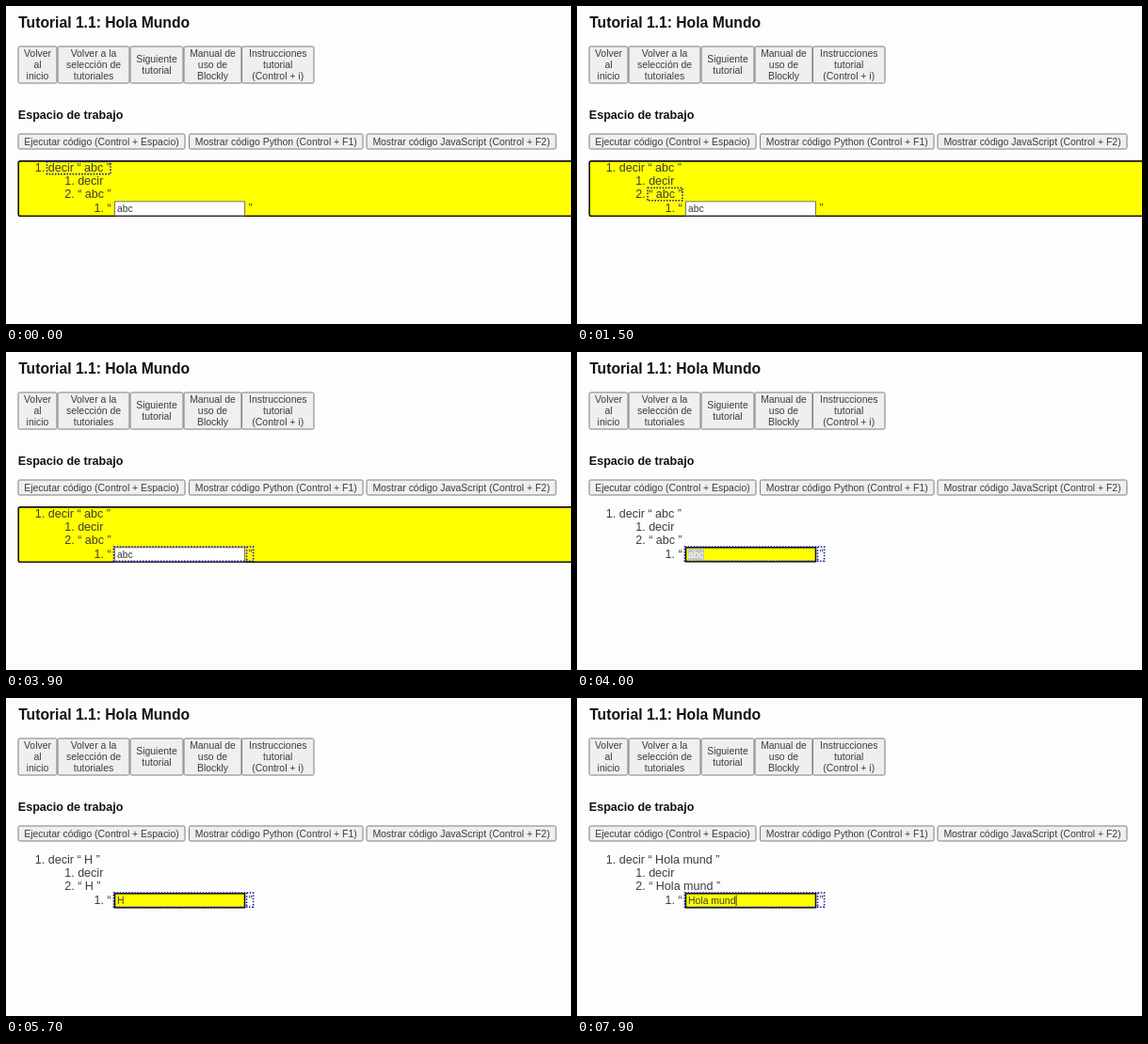
Animation, 600 px wide and 338 px high, one loop 8000 ms. Source, as an HTML page:

```html
<!DOCTYPE html>
<html lang="es">
<head>
<meta charset="utf-8">
<style>
html, body { margin: 0; width: 100%; height: 100%; overflow: hidden; background: #fdfdfd; }
svg { display: block; width: 600px; height: 338px; font: 10.45px "Liberation Sans", Arial, sans-serif; fill: #3c3c3c; }
.title { font-weight: bold; fill: #111; }
.list { font-size: 12.55px; }
.button { fill: #efefef; stroke: #7c7c7c; }
.focus { fill: none; stroke: #1a1aa8; stroke-width: 1.57; stroke-dasharray: 1.57; }
#value { white-space: pre; }
</style>
</head>
<body>
<svg viewBox="0 0 600 338">
  <text class="title" x="13.2" y="22.9" font-size="15.7">Tutorial 1.1: Hola Mundo</text>
  <text class="title" x="12.8" y="120.2" font-size="12.55">Espacio de trabajo</text>
  <g id="buttons"></g>
  <rect id="workspace" x="13.2" y="164.9" width="640" height="58.3" rx="2" fill="#ff0" stroke="#151515" stroke-width="1.6"/>
  <g class="list">
    <text id="statement" x="30.8" y="175.8"></text>
    <text x="62.2" y="190">1. decir</text>
    <text id="argument" x="62.2" y="204.2"></text>
    <text x="93.6" y="219">1. “</text>
    <text x="257.6" y="219">”</text>
  </g>
  <rect id="field" x="115.5" y="207.8" width="138" height="15"/>
  <rect id="selection" x="118" y="209.5" width="17" height="11.5" fill="#c4c4c4"/>
  <text id="value" x="118" y="219"></text>
  <rect id="caret" y="209.5" width="0.9" height="11.5" fill="#222"/>
  <path id="focus" class="focus"/>
</svg>
<script>
const $ = id => document.getElementById(id);

function button(left, right, top, bottom, ...lines) {
  const middle = (left + right) / 2;
  const first = (top + bottom) / 2 + 3.7 - (lines.length - 1) * 6;
  const text = lines.map((line, i) =>
    `<text x="${middle}" y="${first + i * 12}" text-anchor="middle">${line}</text>`).join('');
  $('buttons').innerHTML += `<rect class="button" x="${left}" y="${top}" rx="1.5"
    width="${right - left}" height="${bottom - top}"/>${text}`;
}
const tall = (left, right, ...lines) => button(left, right, 43, 82, ...lines);
const flat = (left, right, line) => button(left, right, 136, 152, line);
tall(13, 54, 'Volver', 'al', 'inicio');
tall(55, 131, 'Volver a la', 'selección de', 'tutoriales');
tall(132, 188, 'Siguiente', 'tutorial');
tall(189, 250, 'Manual de', 'uso de', 'Blockly');
tall(250.5, 327, 'Instrucciones', 'tutorial', '(Control + i)');
flat(13, 190, 'Ejecutar código (Control + Espacio)');
flat(194.5, 379, 'Mostrar código Python (Control + F1)');
flat(383, 584, 'Mostrar código JavaScript (Control + F2)');

const EDIT = 4000, BLINK = 500;
const phrase = 'Hola mund';
const keyTimes = [5100, 6100, 6300, 6400, 7300, 7400, 7500, 7700, 7800];

// Keyboard focus walks through the tree: [start time, outline]
const focusSteps = [
  [0, 'M43.5 165.5H111V178.6H43.5Z'],
  [500, 'M75 179.5H104V193H75Z'],
  [1200, 'M75 193.3H112V206.8H75Z'],
  [2200, 'M114.4 207H262.6V222.2H114.4ZM255.6 207V222.2']
];

function draw(t) {
  const typed = keyTimes.filter(time => time <= t).length;
  const text = typed ? phrase.slice(0, typed) : 'abc';
  const editing = t >= EDIT;

  $('statement').textContent = `1. decir “ ${text} ”`;
  $('argument').textContent = `2. “ ${text} ”`;
  $('value').textContent = text;
  $('focus').setAttribute('d', focusSteps.filter(step => step[0] <= t).pop()[1]);

  const selected = editing && !typed;
  $('workspace').style.display = editing ? 'none' : '';
  $('selection').style.display = selected ? '' : 'none';
  $('value').style.fill = selected ? '#fff' : '';
  $('field').style.cssText = editing
    ? 'fill:#ff0;stroke:#151515;stroke-width:1.6'
    : 'fill:#fff;stroke:#767676;stroke-width:1';

  const caretOn = typed && (t - keyTimes[typed - 1]) % (2 * BLINK) < BLINK;
  $('caret').style.display = caretOn ? '' : 'none';
  $('caret').setAttribute('x', 118.2 + $('value').getComputedTextLength());
}

function tick() {
  draw(performance.now() % 8000);
  requestAnimationFrame(tick);
}
tick();
</script>
</body>
</html>
```
